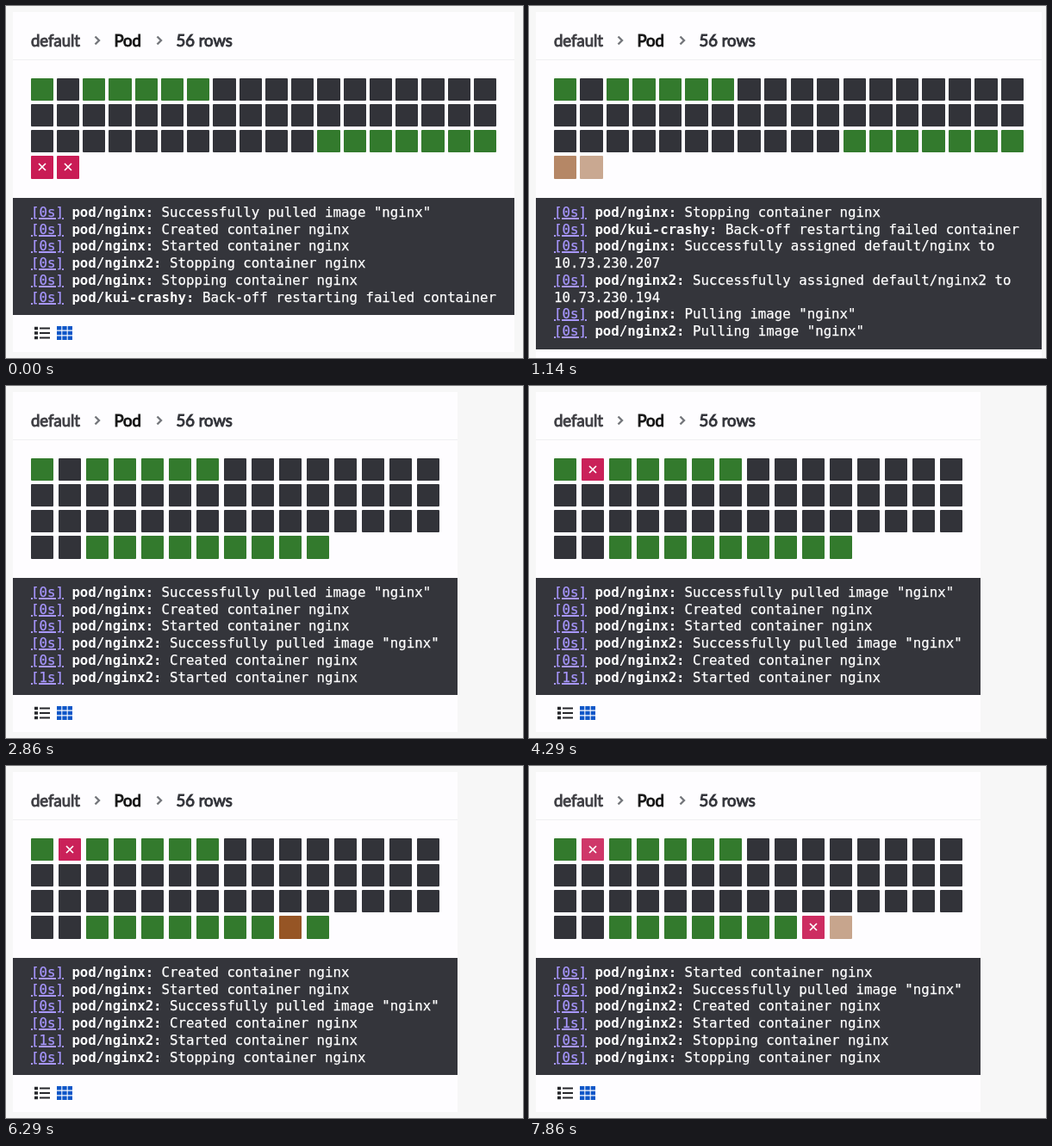
Write an HTML page that moves like this. It is 600x409 px and loops after 8 s.

```html
<!DOCTYPE html>
<html lang="en">
<head>
<meta charset="utf-8">
<title>Pod grid</title>
<style>
  html, body { margin: 0; width: 100%; height: 100%; overflow: hidden; background: #f7f7f7; }
  #panel { position: absolute; left: 8px; top: 6.5px; width: max-content; max-width: 587px; background: #fefdff; }
  #header { position: absolute; left: 0; top: 0; width: 100%; height: 55px; border-bottom: 1px solid #efeff1; }
  #header svg { position: absolute; left: 0; top: 0; }
  #header text { font: 18.5px Lato, sans-serif; -webkit-text-stroke: 0.2px; }
  #grid {
    contain: inline-size; box-sizing: border-box; height: 216.5px; padding: 77.3px 20.6px 0;
    display: grid; grid-template-columns: repeat(auto-fill, 26.4px); grid-auto-rows: 26.4px;
    gap: 3.75px 3.6px; justify-content: space-between; align-content: start;
  }
  #grid svg { display: block; width: 100%; height: 100%; border-radius: 1px; }
  #grid path { stroke: #fff; stroke-width: 1.7; }
  #log {
    padding: 7px 21px 11px; background: #34353b; color: #fff;
    font: 15.74px/19.7px "DejaVu Sans Mono", monospace; -webkit-text-stroke: 0.25px;
  }
  #log b { -webkit-text-stroke: 0; }
  #log u { color: #a897ff; text-decoration-thickness: 1.5px; }
  #tools { display: block; height: 43px; }
</style>
</head>
<body>
<div id="panel">
  <div id="header">
    <svg width="300" height="55">
      <text x="21" y="39.5" fill="#3f3f44" stroke="#3f3f44">default</text>
      <text x="117.5" y="39.5" fill="#151515" stroke="#151515">Pod</text>
      <text x="189.5" y="39.5" fill="#33343a" stroke="#33343a">56 rows</text>
      <path d="M95.5 28.5l4.5 4.5l-4.5 4.5M167.5 28.5l4.5 4.5l-4.5 4.5" fill="none" stroke="#74767b" stroke-width="2.4"/>
    </svg>
  </div>
  <div id="grid"></div>
  <div id="log"></div>
  <svg id="tools" width="90">
    <path d="M25 15.5h4M25 21h4M25 26.5h4" stroke="#26272b" stroke-width="3.6"/>
    <path d="M31 15.5h12M31 21h12M31 26.5h12" stroke="#26272b" stroke-width="2.2"/>
    <path d="M51 15.3h18M51 21h18M51 26.7h18" stroke="#0f57c8" stroke-width="4.6" stroke-dasharray="5.3 1.05"/>
  </svg>
</div>
<script>
const LOOP = 8000, STEP = 1000 / 7, PULSE = 2000, VISIBLE_EVENTS = 6;
const COLORS = { dark: '50 51 57', green: '51 122 45', red: '201 28 85', brown: '132 56 0' };
const KUI = 1, NGINX2 = 54, NGINX = 55;

const pulled = 'Successfully pulled image "nginx"';
const pulling = 'Pulling image "nginx"';
const container = verb => verb + ' container nginx';
const assigned = (pod, ip) => `Successfully assigned default/${pod} to ${ip}`;

// [time, pod, message, age]
const events = [
  [0, 'nginx', pulled],
  [0, 'nginx', container('Created')],
  [0, 'nginx', container('Started')],
  [0, 'nginx2', container('Stopping')],
  [0, 'nginx', container('Stopping')],
  [0, 'kui-crashy', 'Back-off restarting failed container'],
  [280, 'nginx', assigned('nginx', '10.73.230.207')],
  [420, 'nginx2', assigned('nginx2', '10.73.230.194')],
  [850, 'nginx', pulling],
  [990, 'nginx2', pulling],
  [1420, 'nginx', pulled],
  [1560, 'nginx', container('Created')],
  [1850, 'nginx', container('Started')],
  [2130, 'nginx2', pulled],
  [2280, 'nginx2', container('Created')],
  [2560, 'nginx2', container('Started'), '1s'],
  [5930, 'nginx2', container('Stopping')],
  [6990, 'nginx', container('Stopping')],
];

// [time, cell, color, time of full strength when pulsing]
const changes = [
  [0, NGINX2, 'red', 0],
  [0, NGINX, 'red', 0],
  [280, NGINX, 'brown', 170],
  [420, NGINX2, 'brown', 510],
  [1560, NGINX, 'brown', 1515],
  [1850, NGINX, 'green'],
  [2560, NGINX2, 'green'],
  [3560, KUI, 'red', 4160],
  [5930, NGINX2, 'brown', 5950],
  [6990, NGINX, 'brown', 6970],
  [7560, NGINX2, 'red', 7630],
];

const grid = document.getElementById('grid');
const log = document.getElementById('log');
grid.innerHTML = '<svg><path d="M9 9l8 8M17 9l-8 8"/></svg>'.repeat(56);

function paint(i, color, alpha = 1) {
  const cell = grid.children[i];
  cell.style.background = `rgb(${COLORS[color]} / ${alpha})`;
  cell.firstChild.style.display = color === 'red' ? '' : 'none';
}

function pulse(t, peak) {
  return 0.715 + 0.285 * Math.cos((t - peak) / PULSE * 2 * Math.PI);
}

function render(t) {
  for (let i = 0; i < 56; i++) {
    paint(i, i === 0 || (i > 1 && i < 7) || i > 46 ? 'green' : 'dark');
  }
  for (const [start, cell, color, peak] of changes) {
    if (start <= t) paint(cell, color, peak === undefined ? 1 : pulse(t, peak));
  }
  log.innerHTML = events.filter(([start]) => start <= t).slice(-VISIBLE_EVENTS)
    .map(([, pod, message, age = '0s']) => `<div><u>[${age}]</u> <b>pod/${pod}:</b> ${message}</div>`)
    .join('');
}

let lastStep = -1;
function tick() {
  const step = Math.floor((performance.now() % LOOP + 5) / STEP) % (LOOP / STEP);
  if (step !== lastStep) render(step * STEP);
  lastStep = step;
  requestAnimationFrame(tick);
}
tick();
</script>
</body>
</html>
```
